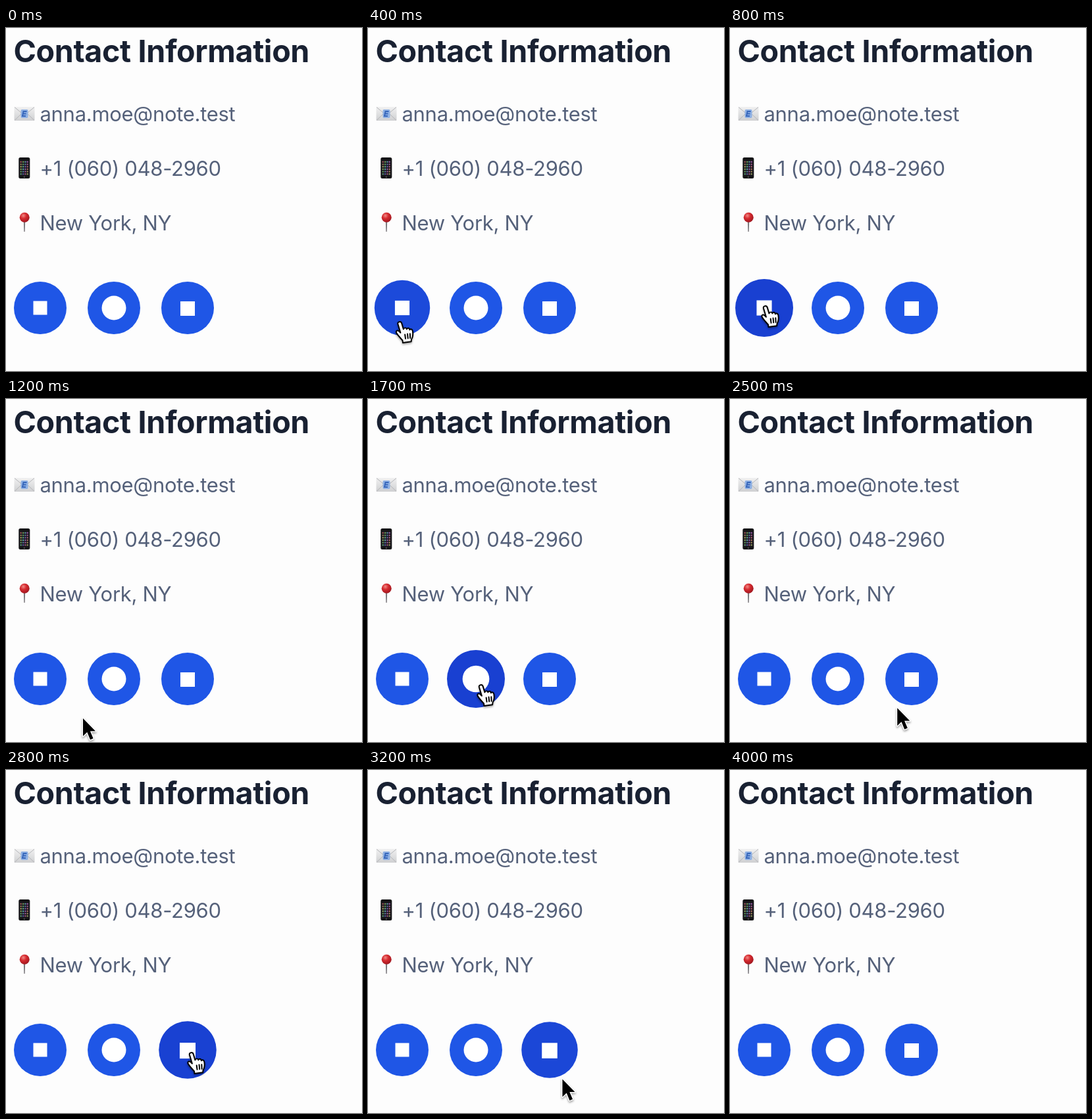
Write an HTML page that moves like this. It is 541 by 522 pixels and loops after 4.3 s.

```html
<!DOCTYPE html>
<html lang="en">
<head>
<meta charset="utf-8">
<title>Contact Information</title>
<style>
  html, body { margin: 0; width: 100%; height: 100%; overflow: hidden; background: #fdfdfd; }
  svg { display: block; width: 541px; height: 522px; }
  text { font-family: Inter, "Open Sans", sans-serif; }
  .title { font-size: 46.6px; font-weight: 700; letter-spacing: -.35px; fill: #192132; }
  .line { font-size: 31px; letter-spacing: -.3px; fill: #55617a; }
  .cursor { filter: drop-shadow(0 2px 1.5px rgba(0, 0, 0, .35)); }
</style>
</head>
<body>
<svg viewBox="0 0 541 522">
  <defs>
    <linearGradient id="paper" x2="0" y2="1">
      <stop stop-color="#f1f1f1"/><stop offset="1" stop-color="#cfd0d2"/>
    </linearGradient>
    <radialGradient id="ball" cx=".38" cy=".32" r=".75">
      <stop stop-color="#f08a85"/><stop offset=".4" stop-color="#d62b30"/><stop offset="1" stop-color="#98131c"/>
    </radialGradient>
  </defs>

  <text class="title" x="11.4" y="52">Contact Information</text>

  <g>
    <rect x="12.5" y="120" width="31" height="21" rx="1.5" fill="url(#paper)"/>
    <path d="M13 140.5L24 130M43 140.5L32 130M13 120.5L28 133L43 120.5" fill="none" stroke="#b4b5b8"/>
    <rect x="22.5" y="124" width="11" height="13" rx="2" fill="#8fb1e4"/>
    <path d="M31.5 127H26.5L25 134H30M26 130.5H30.5" fill="none" stroke="#3767bb" stroke-width="2"/>
  </g>
  <text class="line" x="51.5" y="142">anna.moe@note.test</text>

  <g>
    <rect x="19.3" y="197" width="17" height="32" rx="2.5" fill="#141416"/>
    <rect x="20.8" y="201.5" width="14" height="23" fill="#1d1a22"/>
    <g id="apps"></g>
    <circle cx="27.8" cy="226.7" r="1.2" fill="#4a4a4d"/>
  </g>
  <text class="line" x="51.5" y="225">+1 (060) 048-2960</text>

  <g>
    <path d="M26.8 294H29.2L28.7 310H27.3Z" fill="#7d7b7f"/>
    <circle cx="28.2" cy="288.3" r="7.5" fill="url(#ball)"/>
  </g>
  <text class="line" x="51.5" y="308">New York, NY</text>

  <g class="button"><circle r="40"/><rect x="-10.5" y="-10.5" width="21" height="21" fill="#fff"/></g>
  <g class="button"><circle r="40"/><circle r="18.5" fill="#fff"/></g>
  <g class="button"><circle r="40"/><rect x="-11" y="-10" width="22" height="22" fill="#fff"/></g>

  <g class="cursor" id="arrow">
    <path d="M0 0V27L6.3 21L11 32.5L15.6 30.5L10.9 19.5H19Z" fill="#000" stroke="#fff" stroke-width="3" paint-order="stroke" stroke-linejoin="round"/>
  </g>
  <g class="cursor" id="hand">
    <g transform="translate(-1 .5) scale(.9)" stroke="#000" stroke-width="2.2" stroke-linejoin="round" stroke-linecap="round">
      <path fill="#fff" d="M-3.5 2C-4.5 -2 2 -3 3 1L6 11C7 8 11 8 11.5 11C13 8 16 9 16.5 12C18 10 21 11 21.5 14C22.5 20 22 24 19.5 28L19 32L5 34L4.5 30C1 26 -4 21 -6 17C-7.5 13 -3 12 -1 15L1 17Z"/>
      <path fill="none" d="M8.5 20L9.5 27M12.8 19L13.6 26.5M17 18.5L17.4 26"/>
    </g>
  </g>
</svg>
<script>
  const LOOP = 4300, STEP = 100, FADE = 300;
  const BASE = [31, 86, 230], DARK = [25, 64, 209];

  // Pointer path: time, x, y
  const path = [
    [100, 42, 521], [300, 47, 464], [500, 52, 432], [700, 55, 424], [800, 55, 424],
    [900, 80, 455], [1200, 117, 486], [1300, 132, 488], [1400, 150, 463],
    [1600, 171, 437], [1700, 173, 436], [1800, 188, 458], [2100, 206, 474],
    [2300, 232, 488], [2570, 262, 464], [2750, 282, 433], [2800, 283, 431],
    [3000, 284, 431], [3150, 293, 462], [3500, 310, 521]
  ];
  const hovers = [
    { x: 52, from: 300, to: 900 },
    { x: 164, from: 1400, to: 1800 },
    { x: 276, from: 2570, to: 3150 }
  ];

  const byId = id => document.getElementById(id);
  const arrow = byId("arrow"), hand = byId("hand");
  const buttons = [...document.querySelectorAll(".button")];

  let apps = "";
  for (let i = 0; i < 24; i++) {
    const x = 21.7 + i % 4 * 3.3, y = 202.7 + Math.floor(i / 4) * 3.7;
    apps += `<rect x="${x}" y="${y}" width="2.1" height="2.1" rx=".6" fill="hsl(${i * 97 % 360} 32% 52%)"/>`;
  }
  byId("apps").innerHTML = apps;

  const easeOut = p => {
    p = Math.min(1, Math.max(0, p));
    return 1 - (1 - p) ** 2;
  };

  function pointerAt(t) {
    const i = path.findIndex(p => p[0] > t);
    if (i < 1) return null;
    const [t0, x0, y0] = path[i - 1], [t1, x1, y1] = path[i];
    const k = (t - t0) / (t1 - t0);
    return [x0 + (x1 - x0) * k, y0 + (y1 - y0) * k];
  }

  function place(el, pos, shown) {
    el.style.display = pos && shown ? "" : "none";
    if (pos) el.setAttribute("transform", `translate(${pos[0]} ${pos[1]})`);
  }

  function render(t) {
    buttons.forEach((button, i) => {
      const { x, from, to } = hovers[i];
      const k = easeOut((t - from) / FADE) - easeOut((t - to) / FADE);
      const rgb = BASE.map((c, j) => Math.round(c + (DARK[j] - c) * k));
      button.setAttribute("transform", `translate(${x} 426) scale(${1 + .1 * k})`);
      button.firstElementChild.setAttribute("fill", `rgb(${rgb})`);
    });
    const pos = pointerAt(t);
    const over = hovers.some(h => t >= h.from && t < h.to);
    place(arrow, pos, !over);
    place(hand, pos, over);
  }

  const start = performance.now();
  function tick() {
    const t = (performance.now() - start) % LOOP;
    render(Math.floor(t / STEP) * STEP);
    requestAnimationFrame(tick);
  }
  tick();
</script>
</body>
</html>
```
